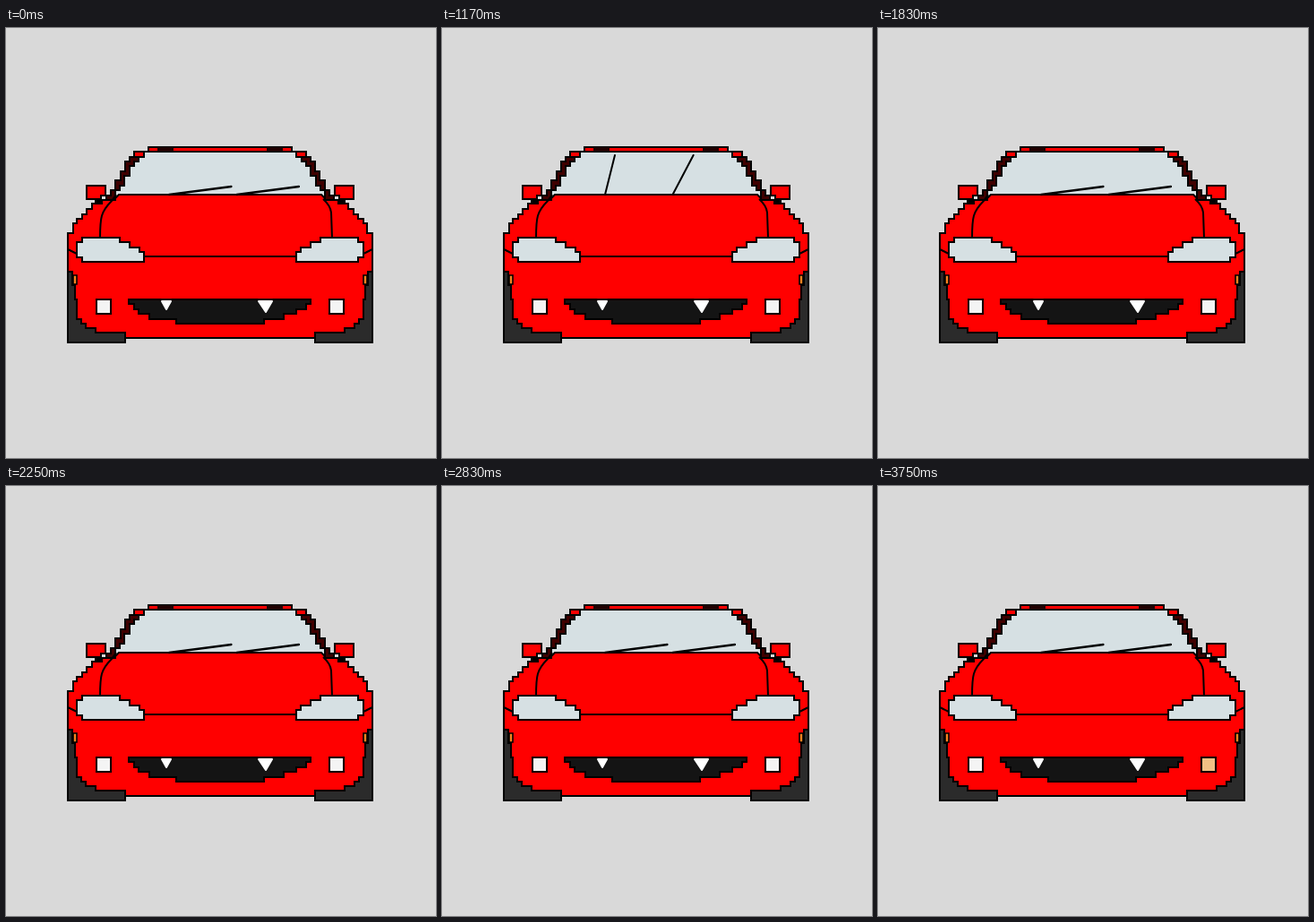
Recreate the animation shown at these times as an HTML page. Size 480x480 px, loop 4000 ms.

```html
<!DOCTYPE html>
<html lang="en">
<head>
<meta charset="utf-8">
<title>Red car</title>
<style>
  html, body { margin: 0; width: 100%; height: 100%; overflow: hidden; background: #d9d9d9; }
  svg { display: block; width: 100%; height: 100%; }
  .line { fill: none; stroke: #000; stroke-width: 2; }
  .red { fill: #f00; }
  .glass { fill: #d6e0e3; }
  .lamp { fill: #f4f4f4; }
</style>
</head>
<body>
<svg viewBox="0 0 480 480">
  <g id="car" stroke="#000" stroke-width="2">
    <g id="half">
      <path class="red" d="M239 133H159V138H143V144H138V149H133V160H128V170H122V181H117V187H112V192H107V196H96V202H90V208H85V213H79V218H75V229H69V351H133V346H239"/>
      <path fill="#400000" d="M143 144H138V149H133V160H128V170H122V181H117V187H112V192H122V181H127V176H132V165H138V154H143V149H148V144Z"/>
      <path class="glass" d="M239 138H154V144H148V149H143V154H138V165H132V176H127V181H122V190L126 186H239"/>
      <path fill="#200000" stroke="none" d="M169 133H187V138H169Z"/>
      <path class="red" d="M90 176H111V187H106V191H90Z"/>
      <path d="M100 193H106V196H100Z"/>
      <path fill="#2b2b2b" d="M69 272H74V287H77V303H79V325H84V330H89V335H100V340H133V351H69Z"/>
      <path fill="#f58220" stroke-width="1.6" d="M75 276H79V286H75Z"/>
      <path class="glass" d="M85 234H127V239H138V245H149V250H154V261H85V256H79V239H85Z"/>
      <path class="line" d="M69 247L79 252M154 255H239"/>
      <path class="lamp" d="M101 303H117V319H101Z"/>
    </g>
    <use href="#half" transform="matrix(-1 0 0 1 478 0)"/>
    <path class="line" d="M105 235C105 211 106 205 118 193L123 186M364 235L363 206Q362 198 354 191"/>
    <path fill="#141414" d="M137 303H340V308H335V314H324V319H310V325H288V330H190V325H160V319H148V314H143V308H137Z"/>
    <path fill="#fff" stroke="#fff" stroke-linejoin="round" d="M174 305H184L179 314ZM282 305H297L290 317Z"/>
    <path id="signal" fill="#f2c084" d="M361 303H377V319H361Z"/>
    <path id="wipers" class="line" stroke-linecap="round"/>
    <g id="beams" fill="#f0efc0" fill-opacity=".63" stroke="none">
      <circle cx="101" cy="249" r="26"/>
      <circle cx="378" cy="248" r="26"/>
    </g>
  </g>
</svg>
<script>
  const [car, wipers, beams, signal] =
    ["car", "wipers", "beams", "signal"].map(id => document.getElementById(id));
  const FPS = 12, LOOP = 48, REST = 7.4;
  const sweep = [REST, 21, 21, 40, 58, 76, 100, 125, 100, 76, 58, 40, 21, REST];

  const within = (step, ...spans) => spans.some(([from, to]) => step >= from && step < to);
  const show = (part, on) => part.setAttribute("visibility", on ? "visible" : "hidden");

  // A blade is shortened where it would pass the top of the windscreen.
  function blade(x, degrees) {
    const a = degrees * Math.PI / 180;
    const length = Math.min(70, 44 / Math.sin(a));
    return `M${x} 186l${length * Math.cos(a)} ${-length * Math.sin(a)}`;
  }

  function draw(now) {
    const step = Math.floor((now + 5) * FPS / 1000) % LOOP;
    const angle = sweep[step - 9] ?? REST;
    wipers.setAttribute("d", blade(182, angle) + blade(257.5, REST + (angle - REST) * 0.8));
    wipers.style.strokeWidth = angle === REST ? 2.4 : 2;
    const shaking = within(step, [25, 27], [29, 31], [32, 34]);
    car.setAttribute("transform", shaking ? "translate(4 -5)" : "");
    show(beams, within(step, [38, 40], [43, 45]));
    show(signal, within(step, [40, 42], [45, 48]));
    requestAnimationFrame(() => draw(performance.now() - start));
  }

  const start = performance.now();
  draw(0);
</script>
</body>
</html>
```
